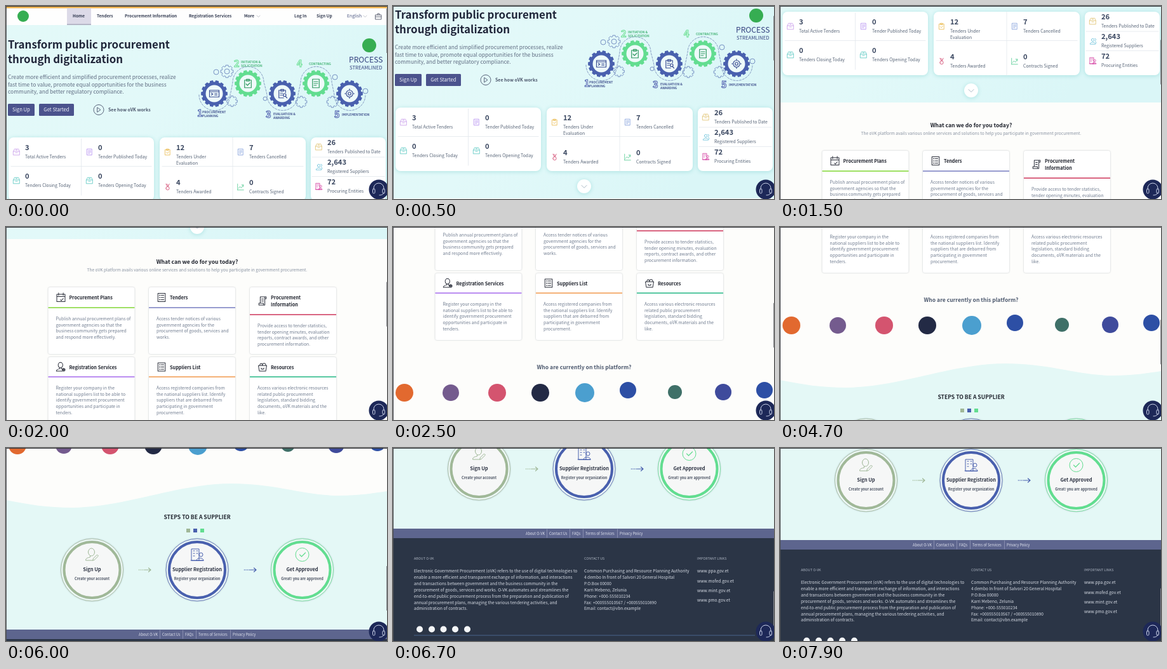
These frames come from a looping animation (600x304 px, 8000 ms). An HTML page:

```html
<!DOCTYPE html>
<html lang="en">
<head>
<meta charset="utf-8">
<title>Procurement portal</title>
<style>
html, body { margin: 0; width: 100%; height: 100%; overflow: hidden; background: #fdfdfb; }
svg { display: block; width: 100vw; height: 100vh; }
text { font-family: "Noto Sans CJK JP", "Noto Sans CJK SC", "Noto Sans CJK", "Noto Sans", sans-serif; white-space: pre; }
.card { filter: drop-shadow(0 1px 3px rgba(80, 190, 185, .36)); }
.tile { filter: drop-shadow(0 .6px 1.2px rgba(60, 70, 90, .32)); }
.line { fill: none; stroke-linecap: round; stroke-linejoin: round; }
</style>
</head>
<body>
<svg id="stage" viewBox="0 0 600 304" preserveAspectRatio="none"></svg>
<script>
const LOOP = 8000, STEP = 100;
const NAVY = "#4960ae", GREEN = "#62dd90", SAGE = "#a0b898", INK = "#343c52";

// Scroll offset by time; equal neighbours are pauses.
const scrollKeys = [
  [0, 0], [300, 24], [900, 92], [1500, 198], [2500, 463], [3200, 568], [3600, 568], [3700, 569],
  [5100, 569], [5400, 626], [5700, 675], [5800, 675], [6000, 728], [6100, 728],
  [6300, 806], [6500, 886], [6600, 886], [6700, 887], [7100, 887], [7300, 903], [7500, 911],
  [7600, 911], [7700, 912], [7800, 912], [7900, 869], [8000, 869]
];

function scrollAt(time) {
  const i = scrollKeys.findIndex(([t]) => t > time);
  const [t0, y0] = scrollKeys[i - 1], [t1, y1] = scrollKeys[i];
  return y0 + (y1 - y0) * (time - t0) / (t1 - t0);
}

const rect = (x, y, w, h, fill, extra = "") =>
  `<rect x="${x}" y="${y}" width="${w}" height="${h}" fill="${fill}" ${extra}/>`;
const circle = (x, y, r, fill, extra = "") =>
  `<circle cx="${x}" cy="${y}" r="${r}" fill="${fill}" ${extra}/>`;
const stroke = (d, color, width = 1, extra = "") =>
  `<path class="line" d="${d}" stroke="${color}" stroke-width="${width}" ${extra}/>`;
// y is the middle of the capitals.
const text = (x, y, size, fill, str, extra = "") =>
  `<text x="${x}" y="${(y + size * .36).toFixed(2)}" font-size="${size}" fill="${fill}" ${extra}>${str.replace(/&/g, "&amp;")}</text>`;
const bold = (x, y, size, fill, str, extra = "") =>
  text(x, y, size, fill, str, `font-weight="700" ${extra}`);
const lines = (x, y, pitch, size, fill, rows, draw = text) =>
  rows.map((row, i) => draw(x, y + i * pitch, size, fill, row)).join("");
const MID = 'text-anchor="middle"';

// Line icons drawn around 0,0 in a box of about 20 units.
const glyphs = {
  box: "M-9-2H9V9H-9ZM-9-2L-6-9H6L9-2M-3 2H3M-2-6H2",
  sheet: "M-7-9H7V9H-7ZM-4-4H4M-4 0H4M-4 4H1",
  list: "M-8-9H8V9H-8ZM-5-5H-3M-1-5H5M-5 0H-3M-1 0H5M-5 5H-3M-1 5H5",
  calendar: "M-9-7H9V9H-9ZM-9-2H9M-5-10V-5M5-10V-5M-1 5L1 7L5 2",
  clip: "M-7-7H7V9H-7ZM-3-9H3V-5H-3ZM-4 1L-1 4L4-1",
  medal: "M-5-9L0 0L5-9M-5 4A5 5 0 1 0 5 4A5 5 0 1 0-5 4M-2-9L2-3",
  chart: "M-9 9V-9M-9 9H9M-6 4L-2-1L2 3L8-6M3-6H8V-1",
  people: "M-4-3A4 4 0 1 0 4-3A4 4 0 1 0-4-3M-8 9C-8 2 8 2 8 9ZM6-7A3 3 0 1 1 7-1M10 7C10 3 9 2 7 1",
  user: "M-6-4A5 6 0 1 0 4-4A5 6 0 1 0-6-4M-3 2V4C-8 5-10 6-10 9H3M1 2V4L4 5M3 6A3 3 0 1 0 9 6A3 3 0 1 0 3 6M6 4V8M4 6H8",
  pen: "M-6-4A5 6 0 1 0 4-4A5 6 0 1 0-6-4M-3 2V4C-8 5-10 6-10 9H0M1 9L2 6L8 0L10 2L4 8Z",
  scroll: "M-5-9H8V-5H5V9H-8V5H-5ZM-2-4H2M-2 0H2M5-9V-5M-8 5H2V9",
  bag: "M-9-3L-7 9H7L9-3ZM-6-3C-6-9 0-9 0-3M-1-3C0-10 8-9 7-3M-3 2A3 3 0 0 0 3 2",
  office: "M-9 9V-9H3V9ZM-6-6H-4M-1-6H1M-6-2H-4M-1-2H1M-6 2H-4M3 0A3 3 0 1 0 9 0A3 3 0 1 0 3 0M-1 9C-1 4 10 4 10 9ZM-10 9H10",
  cog: "M-7 0A7 7 0 1 1 7 0A7 7 0 1 1-7 0M-3 0A3 3 0 1 0 3 0A3 3 0 1 0-3 0M0-10V-7M0 7V10M-10 0H-7M7 0H10",
  screen: "M-10-7H10V7H-10ZM-10-4H10M-6-1L-3 1L-6 3M1 0H6M1 3H6",
  search: "M3 9H-7V-7H7V-2M-3-9H3V-5H-3ZM-4-1H1M-4 3H0M2 3A3 3 0 1 0 8 3A3 3 0 1 0 2 3M7 6L10 9"
};
const icon = (name, x, y, color, scale = .5, width = 1.5) =>
  `<g transform="translate(${x} ${y}) scale(${scale})">${stroke(glyphs[name], color, width)}</g>`;

function gearPath(x, y, r, depth, teeth) {
  const points = [];
  for (let i = 0; i < teeth; i++) {
    for (const [offset, radius] of [[-.36, r], [-.26, r + depth], [.26, r + depth], [.36, r]]) {
      const a = (i + offset) / teeth * 2 * Math.PI;
      points.push((x + radius * Math.cos(a)).toFixed(2) + " " + (y + radius * Math.sin(a)).toFixed(2));
    }
  }
  return "M" + points.join("L") + "Z";
}

function header() {
  const nav = [[143, "Tenders"], [187, "Procurement Information"], [288, "Registration Services"],
    [375, "More"], [454, "Log In"], [489, "Sign Up"]];
  return rect(0, 0, 600, 30, "#fefefe") + rect(0, 1, 600, 2.5, "#eeb14c") +
    circle(27, 16, 9, "#36ad52") + rect(96, 3.5, 38, 26, "#dcdae8") + rect(96, 28.5, 38, 1.2, "#9a9bb0") +
    bold(105, 16, 6.5, INK, "Home") + nav.map(([x, s]) => bold(x, 16, 6.5, INK, s)).join("") +
    text(537, 16, 6.8, "#4b5680", "English") +
    stroke("M395 15L397.500 17.500L400 15M563 15L565.500 17.500L568 15", "#b4b8c2", .8) +
    stroke("M582 14H591V21H582ZM585 14V12H588V14M582 17H591", "#555b6c", .9);
}

function process() {
  const steps = [[328, 138, NAVY, "screen"], [381, 122, GREEN, "clip"], [435, 138, NAVY, "search"],
    [488, 122, GREEN, "sheet"], [541, 138, NAVY, "cog"]];
  const labels = [
    [1, 301, 169, 309, 167, NAVY, ["PROCUREMENT", "PLANNING"]],
    [2, 359, 91, 370, 88, GREEN, ["INITIATION &", "SOLICITATION"]],
    [3, 409, 171, 421, 170, NAVY, ["EVALUATION &", "AWARDING"]],
    [4, 458, 91, 477, 91.5, GREEN, ["CONTRACTING"]],
    [5, 517, 171, 529, 171, NAVY, ["IMPLEMENTATION"]]];
  const cogs = [[348, 103, 8], [356, 150, 6.5], [465, 151, 7], [514, 151, 7]];
  const dots = [[331, 104, 4], [408, 146, 3], [518, 112, 4], [566, 134, 4]];
  const outline = "#5f79b6";
  return stroke("M304 140A24.500 24.500 0 0 0 353 140Q355 132 357 120A24.500 24.500 0 0 1 406 120Q409 130 411 140A24.500 24.500 0 0 0 460 140Q462 130 464 120A24.500 24.500 0 0 1 513 120Q515 130 517 140A24.500 24.500 0 0 0 566 140", "#6f83b4", .8, 'stroke-dasharray="3 2"') +
    cogs.map(([x, y, r]) => stroke(gearPath(x, y, r, 2, 8), outline, .8)).join("") +
    circle(348, 103, 4, "none", `stroke="${outline}" stroke-width=".8"`) +
    dots.map(([x, y, r]) => circle(x, y, r, "none", `stroke="${outline}" stroke-width=".8"`)).join("") +
    steps.map(([x, y, color, name]) =>
      `<path d="${gearPath(x, y, 18.5, 2.5, 14)}" fill="${color}"/>` +
      circle(x, y, 13.5, "#eefafa") + icon(name, x, y, color === NAVY ? "#3c4f94" : "#2f9960", .75, 1.6)).join("") +
    labels.map(([n, nx, ny, x, y, color, rows]) =>
      bold(nx, ny, 14.5, "#f3fcfb", String(n), `stroke="${color}" stroke-width="1"`) +
      lines(x, y, 5.8, 4.9, color === NAVY ? "#42538f" : "#46b477", rows, bold)).join("") +
    circle(572, 62, 11, "#36ad52") +
    text(540, 85, 12.1, "#33427f", "PROCESS") + text(541, 97, 7.75, "#33427f", "STREAMLINED");
}

function hero() {
  return rect(0, 0, 600, 350, "url(#sky)") + header() +
    lines(3, 61, 22.5, 16.9, "#20263a", ["Transform public procurement", "through digitalization"], bold) +
    lines(3, 112, 11.6, 8.46, "#5f6c82", [
      "Create more efficient and simplified procurement processes, realize",
      "fast time to value, promote equal opportunities for the business",
      "community, and better regulatory compliance."]) +
    rect(3, 154, 42, 19, "#4b538d", 'rx="1.5"') + rect(52, 154, 55, 19, "#4b538d", 'rx="1.5"') +
    text(24, 163.5, 7.7, "#f3f4fa", "Sign Up", MID) + text(79.5, 163.5, 7.7, "#f3f4fa", "Get Started", MID) +
    circle(146, 163.5, 8, "none", 'stroke="#59637a" stroke-width="1"') +
    stroke("M144 160L149 163.500L144 167Z", "#59637a") +
    bold(161, 163.5, 7, "#4f5a6f", "See how oVK works") + process() + stats() +
    `<g class="card">${circle(301, 331, 11, "#fff")}</g>` + stroke("M297 329.500L301 333.500L305 329.500", "#a9b9c4", 1);
}

function stats() {
  const cells = [
    [30, 223, "3", ["Total Active Tenders"], "box", "#c79bea"],
    [145, 223, "0", ["Tender Published Today"], "sheet", "#b18af0"],
    [30, 268, "0", ["Tenders Closing Today"], "box", "#55c7c0"],
    [145, 268, "0", ["Tenders Opening Today"], "box", "#55c7c0"],
    [268, 223, "12", ["Tenders Under", "Evaluation"], "clip", "#e9b849"],
    [383, 223, "7", ["Tenders Cancelled"], "sheet", "#7e9bda"],
    [268, 278, "4", ["Tenders Awarded"], "medal", "#cf3f68"],
    [383, 278, "0", ["Contracts Signed"], "chart", "#4fc98f"],
    [506, 215, "26", ["Tenders Published to Date"], "box", "#dfc06a"],
    [506, 246, "2,643", ["Registered Suppliers"], "people", "#64bfd8"],
    [506, 277, "72", ["Procuring Entities"], "office", "#d64aa6"]];
  const panels = [[4, 229], [242, 230], [480, 118]];
  return panels.map(([x, w]) => `<g class="card">${rect(x, 207, w, 100, "#fff", 'rx="8"')}</g>`).join("") +
    stroke("M118.500 209V298M8 252.500H229M357 207V307M246 252.500H468M482 238H596M482 268.500H596", "#e3e8ec", .8) +
    cells.map(([x, y, n, label, name, color]) =>
      icon(name, x - 13.5, y + 7, color, .53, 1.5) + bold(x, y, 11.2, "#3a4760", n) +
      lines(x, y + 15, 9.5, 6.9, "#566376", label)).join("");
}

function services() {
  const cards = [
    [66.5, 426, 32, "calendar", ["Procurement Plans"], "#8edb4a", ["Publish annual procurement plans of",
      "government agencies so that the", "business community gets prepared", "and respond more effectively."]],
    [225, 426, 32, "list", ["Tenders"], "#858bc7", ["Access tender notices of various",
      "government agencies for the", "procurement of goods, services and", "works."]],
    [384, 426, 43, "scroll", ["Procurement", "Information"], "#d34b6c", ["Provide access to tender statistics,",
      "tender opening minutes, evaluation", "reports, contract awards, and other", "procurement information."]],
    [66.5, 536, 31, "user", ["Registration Services"], "#b07bef", ["Register your company in the",
      "national suppliers list to be able to", "identify government procurement", "opportunities and participate in", "tenders."]],
    [225, 536, 31, "list", ["Suppliers List"], "#f3a560", ["Access registered companies from",
      "the national suppliers list. Identify", "suppliers that are debarred from", "participating in government", "procurement."]],
    [384, 536, 31, "bag", ["Resources"], "#3bbf92", ["Access various electronic resources",
      "related public procurement", "legislation, standard bidding", "documents, oVK materials and the", "like."]]];
  return bold(301, 386, 8.6, "#20242e", "What can we do for you today?", MID) +
    text(301, 399, 6.6, "#8791a0", "The oVK platform avails various online services and solutions to help you participate in government procurement.", MID) +
    cards.map(([x, y, head, name, title, color, body]) =>
      `<g class="tile">${rect(x, y, 136, 105, "#fff", 'rx="3"')}</g>` +
      rect(x, y + head - .8, 136, 1.7, color) + icon(name, x + 20, y + head / 2, "#2b2f3b", .72, 1.4) +
      lines(x + 33, y + head / 2 + .5 - (title.length - 1) * 5.3, 10.6, 7.25, "#20242e", title, bold) +
      lines(x + 12, y + head + 17.3, 9.75, 6.85, "#717d90", body)).join("");
}

function members() {
  const marks = [[18, 724, 14, "#e2692f"], [91, 724, 13, "#745b8e"], [164, 724, 14, "#d4546f"],
    [232, 724, 14, "#232a45"], [302, 724, 15, "#4b9fcf"], [370, 720, 13, "#2d4fa5"],
    [444, 723, 11, "#3f7068"], [520, 723, 13, "#3f4b9c"], [585, 720, 13, "#2d4fa5"]];
  return bold(301, 684, 8.55, "#4e5a6f", "Who are currently on this platform?", MID) +
    marks.map(m => circle(...m)).join("");
}

function steps() {
  const rings = [[135.5, SAGE, "Sign Up", "Create your account", "pen"],
    [301, NAVY, "Supplier Registration", "Register your organization", "office"],
    [466.5, GREEN, "Get Approved", "Great! you are approved", ""]];
  const arrow = (x, color) =>
    stroke(`M${x} 920H${x + 8}`, color, 1.5, 'stroke-dasharray="0 2.5"') +
    stroke(`M${x + 9} 920H${x + 18}M${x + 15} 917L${x + 18.5} 920L${x + 15} 923`, color, 1.2);
  return `<path d="M0 810C35 817 65 822 105 822C190 821 270 784 355 784C425 784 470 803 525 803C555 803 580 799 600 796V1015H0Z" fill="#e4f8f6"/>` +
    bold(301, 837, 8.6, "#20242e", "STEPS TO BE A SUPPLIER", MID) +
    [SAGE, NAVY, GREEN].map((c, i) => rect(284 + i * 11, 855, 6, 6, c)).join("") +
    rings.map(([x, color, title, note, name]) =>
      `<g class="tile">${circle(x, 920, 49, "#edf8f7", `stroke="${color}" stroke-width=".8"`)}</g>` +
      circle(x, 920, 44, "#f6f7f7", `stroke="${color}" stroke-width="4"`) +
      (name ? icon(name, x, 896, color, 1, 1)
        : circle(x, 896, 10.5, "none", `stroke="${color}"`) + stroke(`M${x - 4} 896L${x - 1} 899L${x + 5} 893`, color, 1.2)) +
      bold(x, 919, 7.5, "#2c3242", title, MID) + bold(x, 934, 5.6, "#4a5262", note, MID)).join("") +
    arrow(209.5, SAGE) + arrow(375.5, NAVY);
}

function footer() {
  const links = [[209, "About O-VK"], [246, "Contact Us"], [282, "FAQs"], [303, "Terms of Services"], [357, "Privacy Policy"]];
  const heads = [[33, "ABOUT O-VK"], [301, "CONTACT US"], [479, "IMPORTANT LINKS"]];
  const pale = "#d9dee7";
  return rect(0, 1014, 600, 15, "#5d658e") + rect(0, 1029, 600, 200, "#2b3546") +
    links.map(([x, s]) => text(x, 1021.5, 5.65, "#e0e3ee", s)).join("") +
    stroke("M242.500 1015V1028M278.500 1015V1028M299.500 1015V1028M353.500 1015V1028", "#9aa0bd", .7) +
    heads.map(([x, s]) => text(x, 1061, 5.4, "#aeb6c3", s)).join("") +
    lines(33, 1081, 9.85, 6.57, pale, [
      "Electronic Government Procurement (oVK) refers to the use of digital technologies to",
      "enable a more efficient and transparent exchange of information, and interactions",
      "and transactions between government and the business community in the",
      "procurement of goods, services and works. O-VK automates and streamlines the",
      "end-to-end public procurement process from the preparation and publication of",
      "annual procurement plans, managing the various tendering activities, and",
      "administration of contracts."]) +
    lines(301, 1081, 9.85, 6.57, pale, [
      "Common Purchasing and Resource Planning Authority",
      "4 dembo In front of Salvori 20 General Hospital",
      "P.O.Box 00000", "Karri Mebeno, Zelunia", "Phone: +000-555010234",
      "Fax: +000555010567 / +000555010890", "Email: contact@vbn.example"]) +
    lines(479, 1081, 15.3, 6.6, pale, ["www.ppa.gov.et", "www.mofed.gov.et", "www.mint.gov.et", "www.pmo.gov.et"]) +
    [42, 61, 79.5, 98, 117].map(x => circle(x, 1172.5, 5, "#f4f6f8")).join("") +
    rect(33, 1181.6, 537, .9, "#4c6a93");
}

function overlay() {
  return rect(0, 0, 600, 1, "#34363b") + rect(0, 0, .9, 304, "#4a4c52") +
    `<rect id="thumb" x="599" width="1" height="70" fill="#85878c"/>` +
    circle(587, 289, 15.5, "#1d2858") +
    stroke("M579 289V287A8 8 0 0 1 595 287V289M595 294Q594 298 588 298", "#c9d1e8", 1) +
    rect(577.5, 288, 3.5, 7, "none", 'rx="1.4" stroke="#c9d1e8"') +
    rect(593, 288, 3.5, 7, "none", 'rx="1.4" stroke="#c9d1e8"');
}

document.getElementById("stage").innerHTML =
  `<defs><linearGradient id="sky" x1="0" y1="0" x2="1" y2=".5">
    <stop offset="0" stop-color="#e3f9f8"/><stop offset=".5" stop-color="#e2f9f9"/><stop offset="1" stop-color="#daf6f7"/>
  </linearGradient></defs>` + rect(0, 0, 600, 304, "#fdfdfb") +
  `<g id="page">${hero() + services() + members() + steps() + footer()}</g>` + overlay();

const page = document.getElementById("page"), thumb = document.getElementById("thumb");

function render(now) {
  const time = Math.floor(now % LOOP / STEP) * STEP;
  const y = scrollAt(time);
  page.setAttribute("transform", `translate(0 ${-Math.round(y)})`);
  thumb.setAttribute("y", 4 + y * .25);
  requestAnimationFrame(render);
}
render(performance.now());
</script>
</body>
</html>
```
